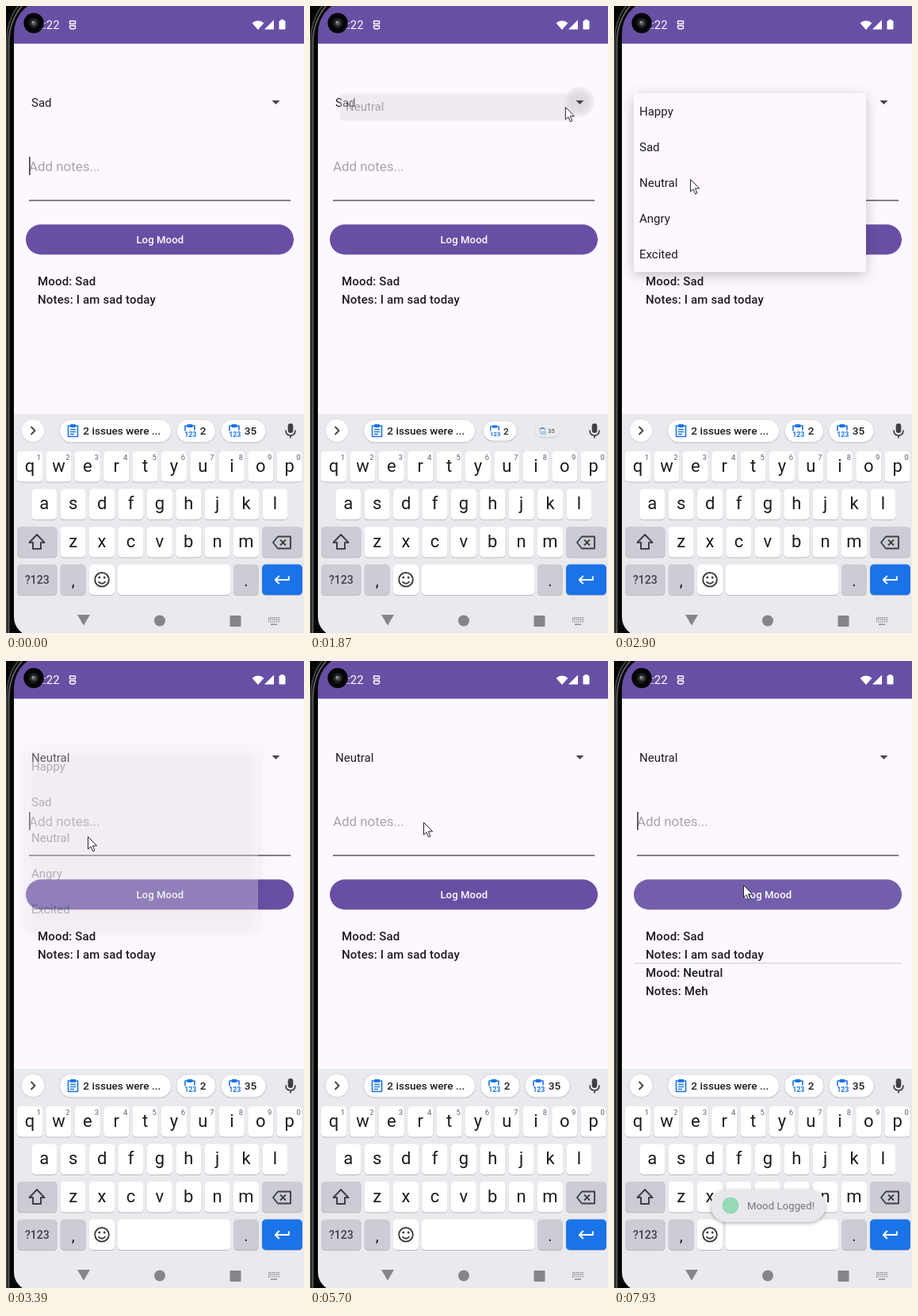
Recreate the animation shown at these times as an HTML page with a canvas. Size 376x790 px, loop 8000 ms.

```html
<!DOCTYPE html>
<html lang="en">
<head>
<meta charset="utf-8">
<title>Mood log</title>
<style>
html, body { margin: 0; width: 100%; height: 100%; overflow: hidden; background: #000; }
canvas { display: block; width: 376px; height: 790px; }
</style>
</head>
<body>
<canvas id="stage"></canvas>
<script>
const W = 376, H = 790, LOOP = 8000;
const canvas = document.getElementById('stage');
const ratio = window.devicePixelRatio || 1;
canvas.width = W * ratio;
canvas.height = H * ratio;
const c = canvas.getContext('2d');

const PURPLE = '#6750a4', PAGE = '#fdf7ff', INK = '#1d1b20', BOARD = '#e9eaee', BLUE = '#1a73e8';
const MOODS = ['Happy', 'Sad', 'Neutral', 'Angry', 'Excited'];

// pointer tip: time, x, y
const PATH = [
  [700, 366, 468], [860, 352, 330], [1020, 340, 180], [1160, 336, 89], [1390, 328, 122],
  [1520, 328, 122], [1870, 322, 127], [2040, 300, 133], [2280, 253, 134], [2350, 240, 140],
  [2500, 165, 180], [2700, 84, 222], [2900, 96, 218], [3100, 103, 221], [3400, 103, 221],
  [3850, 143, 203], [6710, 143, 203], [6710, 190, 209], [6880, 190, 209],
  [7140, 172, 246], [7390, 151, 275], [7660, 163, 282], [8000, 163, 282]
];
const CARET_ON = [[0, 370], [870, 1370], [3250, 3750], [4250, 4710], [5240, 5700],
  [5770, 6910], [7410, 8000]];

const part = (t, from, span) => Math.min(1, Math.max(0, (t - from) / span));
const ease = p => p * p * (3 - 2 * p);

function text(s, x, y, size, color, opt = {}) {
  c.font = `${opt.weight || 400} ${size}px Roboto, sans-serif`;
  c.letterSpacing = (opt.space || 0) + 'px';
  c.textAlign = opt.align || 'left';
  c.fillStyle = color;
  c.fillText(s, x, y);
  c.letterSpacing = '0px';
}

function box(x, y, w, h, r, color) {
  c.fillStyle = color;
  c.beginPath();
  c.roundRect(x, y, w, h, r);
  c.fill();
}

function disc(x, y, r, color) {
  c.fillStyle = color;
  c.beginPath();
  c.arc(x, y, r, 0, 7);
  c.fill();
}

function shape(points, color) {
  c.fillStyle = color;
  c.beginPath();
  points.forEach(([x, y]) => c.lineTo(x, y));
  c.closePath();
  c.fill();
}

function stroke(d, color, width, x = 0, y = 0) {
  c.save();
  c.translate(x, y);
  c.strokeStyle = color;
  c.lineWidth = width;
  c.lineJoin = 'round';
  c.stroke(new Path2D(d));
  c.restore();
}

function shadow(color, blur, y) {
  c.shadowColor = color;
  c.shadowBlur = blur * ratio;
  c.shadowOffsetY = y * ratio;
}

function statusBar() {
  box(10, 0, 366, 47.6, 0, PURPLE);
  text('12:22', 67.5, 29, 14.8, '#fff', { align: 'right' });
  stroke('M-3.5 -5H3.5V-1.5H-3.5ZM-3.5 1H3.5V3Q3.5 5 0 5Q-3.5 5 -3.5 3Z', '#fff', 1.4, 84, 24);
  c.fillStyle = '#fff';
  c.beginPath();
  c.moveTo(318, 30);
  c.arc(318, 29, 10.5, -Math.PI * 0.75, -Math.PI * 0.25);
  c.fill();
  shape([[326, 29.5], [338, 29.5], [338, 17.5]], '#fff');
  box(344.5, 18.5, 8, 11, 1, '#fff');
  box(346.5, 17, 4, 2, 0, '#fff');
}

function phoneFrame() {
  c.fillStyle = '#060606';
  c.beginPath();
  c.rect(0, 0, W, H);
  c.roundRect(10, -8, 420, 802, [42, 0, 0, 24]);
  c.fill('evenodd');
  stroke('M1 790V46Q1 14 19 -4', '#3c3c3e', 2);
  stroke('M3.5 790V48Q3.5 16 24 -4', '#6a6a6c', 1.6);
  disc(35, 21.5, 12.7, '#050506');
  disc(35, 21.5, 6.5, '#1d1e22');
  disc(35, 21.5, 3.2, '#55575f');
  disc(34, 20.5, 1.2, '#a5a7af');
}

function spinnerRipple(t) {
  const a = part(t, 1520, 120) * (1 - part(t, 1930, 300));
  if (!a) return;
  const r = 13 + 6 * part(t, 1520, 200);
  const glow = c.createRadialGradient(340, 121, 0, 340, 121, r);
  glow.addColorStop(0, `rgba(40,30,45,${0.15 * a})`);
  glow.addColorStop(0.6, `rgba(40,30,45,${0.12 * a})`);
  glow.addColorStop(1, `rgba(40,30,45,${0.04 * a})`);
  disc(340, 121, r, glow);
}

function form(t) {
  const picked = t >= 3250, logged = t >= 7800;

  spinnerRipple(t);
  text(picked ? 'Neutral' : 'Sad', 32, 127, 15, INK);
  shape([[335.5, 119], [345.5, 119], [340.5, 124]], '#49454f');

  const typed = logged || t < 5770 ? '' : t < 6040 ? 'M' : t < 6170 ? 'Me' : 'Meh';
  if (typed) {
    text(typed, 29, 208, 16.9, INK);
    const end = typed === 'Meh' ? (t < 6440 ? 53 : 62) : 29 + c.measureText(typed).width;
    box(29, 209.3, end - 29, 1, 0, INK);
  } else text('Add notes...', 29, 208, 16.9, '#a9a5ac');
  if (CARET_ON.some(([a, b]) => t >= a && t < b)) {
    const x = typed ? 29 + c.measureText(typed).width : 29;
    box(x, 190, 1.7, 23, 0, '#49454f');
  }
  box(29, 244.3, 330, 1.5, 0, '#5a565f');

  box(25, 275.2, 338, 38, 19, PURPLE);
  if (t >= 7730) {
    c.save();
    c.beginPath();
    c.roundRect(25, 275.2, 338, 38, 19);
    c.clip();
    disc(163, 288, 30 + 190 * part(t, 7730, 150), 'rgba(255,255,255,.08)');
    c.restore();
  }
  text('Log Mood', 194.3, 299, 13.1, '#fff', { weight: 500, space: 0.1, align: 'center' });

  entry('Sad', 'I am sad today', 352);
  if (logged) {
    box(25, 380, 338, 1.4, 0, '#dcd7df');
    entry('Neutral', 'Meh', 398);
  }
}

function entry(mood, note, y) {
  const style = { weight: 500, space: 0.15 };
  text('Mood: ' + mood, 40, y, 15, INK, style);
  text('Notes: ' + note, 40, y + 23, 15, INK, style);
}

function popup(t) {
  const alpha = part(t, 1815, 160) * (1 - part(t, 3265, 180));
  if (!alpha) return;
  const open = ease(part(t, 1815, 250)), left = 1 - open;
  const dx = 15 * left, dy = 110 * left, h = 225 - 2 * dy;
  c.save();
  c.globalAlpha = alpha;
  shadow('rgba(0,0,0,.22)', 16 * open, 4 * open);
  box(25 + dx, 110, 293, h, 2, PAGE);
  c.shadowColor = 'transparent';
  c.beginPath();
  c.rect(25 + dx, 110, 293, h);
  c.clip();
  const press = part(t, 3170, 60) * (1 - part(t, 3250, 80));
  box(25, 200.5, 293, 45, 0, `rgba(40,30,45,${0.1 * press})`);
  MOODS.forEach((m, i) => text(m, 32 + dx, 138 + 45 * i - dy, 15, INK));
  c.restore();
}

function chip(t, i, x, w, label) {
  let size = 1, alpha = 1;
  if (t >= 1590 && t < 2200) {
    const start = 1700 + 70 * i;
    if (t < start) alpha = 1 - part(t, 1590, 70);
    else {
      const p = part(t, start, 130);
      size = 0.4 + 0.6 * p;
      alpha = Math.min(1, 0.2 + 2 * p);
    }
  }
  if (!alpha) return;
  c.save();
  c.globalAlpha = alpha;
  c.translate(x + w / 2, 535.5);
  c.scale(size, size);
  c.translate(-w / 2, 0);
  shadow('rgba(0,0,0,.28)', 2, 0.6);
  box(0, -14, w, 28, 14, '#fff');
  c.shadowColor = 'transparent';
  if (i) {
    stroke('M10.5 0V-6.5H22.5V-1', BLUE, 1.6);
    box(13, -8.5, 7, 4, 1, BLUE);
    text('123', 17.3, 7.5, 8.8, BLUE, { weight: 700, align: 'center' });
  } else {
    stroke('M10.5 -6.5H22.5V7H10.5ZM13 -2H20M13 1H20M13 4H18', BLUE, 1.6);
    box(13, -8.5, 7, 4, 1, BLUE);
  }
  text(label, 29.3, 4.8, 13.6, INK, { weight: 500 });
  c.restore();
}

const rowY = row => 561 + 47.5 * row;

function key(x, row, w, color = '#fff') {
  box(x, rowY(row) + 1, w, 38.6, 5, '#b9bbc2');
  box(x, rowY(row), w, 38.6, 5, color);
}

function letters(chars, x, row) {
  [...chars].forEach((ch, i) => {
    const kx = x + i * 36.4;
    key(kx, row, 32);
    text(ch, kx + 16, rowY(row) + 25.5, 22, INK, { align: 'center' });
  });
}

function keyboard(t) {
  const gray = '#cbccd4', ink = '#3f4145';
  box(10, 514, 366, 276, 0, BOARD);

  shadow('rgba(0,0,0,.18)', 2, 0.5);
  disc(34, 535, 14.2, '#fff');
  c.shadowColor = 'transparent';
  stroke('M-2.5 -5L2.5 0L-2.5 5', ink, 1.8, 34, 535);
  chip(t, 0, 68, 140, '2 issues were ...');
  chip(t, 1, 215.5, 48.5, '2');
  chip(t, 2, 271.5, 56, '35');
  box(355.7, 526, 6.6, 12, 3.3, ink);
  stroke('M-6 0Q-6 6.5 0 6.5Q6 6.5 6 0M0 6.5V10', ink, 1.7, 359, 534.5);

  letters('qwertyuiop', 14, 0);
  [...'1234567890'].forEach((d, i) =>
    text(d, 41.5 + i * 36.4, 572, 9.5, '#5f6166', { align: 'center' }));
  letters('asdfghjkl', 32.3, 1);
  letters('zxcvbnm', 68.6, 2);

  key(14, 2, 50.5, gray);
  stroke('M0 -9.5L9.5 0.5H5V8.5H-5V0.5H-9.5Z', ink, 2, 39, 675.5);
  key(323, 2, 51, gray);
  stroke('M-11 0L-5 -7.5H11V7.5H-5ZM-2 -3.5L5 3.5M5 -3.5L-2 3.5', ink, 1.9, 348, 676);

  key(14, 3, 50.5, gray);
  text('?123', 39.3, 728, 14, ink, { align: 'center', weight: 500 });
  key(68.6, 3, 32, gray);
  text(',', 84.6, 731, 20, INK, { align: 'center' });
  key(105, 3, 32);
  stroke('M8.8 0A8.8 8.8 0 1 1 -8.8 0A8.8 8.8 0 1 1 8.8 0M-4.5 2.5Q0 7.5 4.5 2.5', ink, 2, 121, 722.7);
  disc(117.8, 720, 1.5, ink);
  disc(124.2, 720, 1.5, ink);
  key(141, 3, 142);
  key(287, 3, 32, gray);
  text('.', 303, 731, 20, INK, { align: 'center' });
  key(323, 3, 51, BLUE);
  stroke('M8.5 -4.5V0H-8M-3.5 -5L-8.5 0L-3.5 5', '#fff', 2, 348.3, 723);

  const nav = '#85868a';
  shape([[90, 767], [106, 767], [98, 780.5]], nav);
  disc(194, 774.5, 7, nav);
  box(282.5, 768, 14, 14, 1, nav);
  for (let r = 0; r < 3; r++)
    for (let i = 0; i < 6; i++) box(331 + i * 2.5, 770 + r * 2.6, 1.4, 1.4, 0, nav);
  box(334, 778.5, 8, 1.4, 0, nav);
}

function toast(t) {
  const alpha = part(t, 7800, 130);
  if (!alpha) return;
  c.save();
  c.globalAlpha = alpha;
  shadow('rgba(0,0,0,.3)', 4, 1.5);
  box(122, 666, 145, 41, 20.5, '#e9e7eb');
  c.shadowColor = 'transparent';
  disc(147, 686, 10.5, '#96d9b6');
  text('Mood Logged!', 168, 691, 13.1, '#77757a', { space: 0.1 });
  c.restore();
}

function pointer(t) {
  if (t < PATH[0][0]) return;
  const i = PATH.findIndex(p => p[0] > t);
  const [ta, xa, ya] = PATH[i - 1], [tb, xb, yb] = PATH[i];
  const p = (t - ta) / (tb - ta);
  c.save();
  c.translate(xa + (xb - xa) * p, ya + (yb - ya) * p);
  const arrow = new Path2D('M.5 .5V16L4 12.7L6.6 18.8L9 17.7L6.4 11.8H11.7Z');
  c.fillStyle = '#fff';
  c.fill(arrow);
  c.strokeStyle = '#25232a';
  c.lineWidth = 1;
  c.stroke(arrow);
  c.restore();
}

function draw(now) {
  const t = Math.min(now % LOOP, 7940);
  c.setTransform(ratio, 0, 0, ratio, 0, 0);
  box(0, 0, W, H, 0, PAGE);
  statusBar();
  form(t);
  keyboard(t);
  popup(t);
  toast(t);
  phoneFrame();
  pointer(t);
}

const begin = performance.now();
function loop() {
  draw(performance.now() - begin);
  requestAnimationFrame(loop);
}
loop();
</script>
</body>
</html>
```
